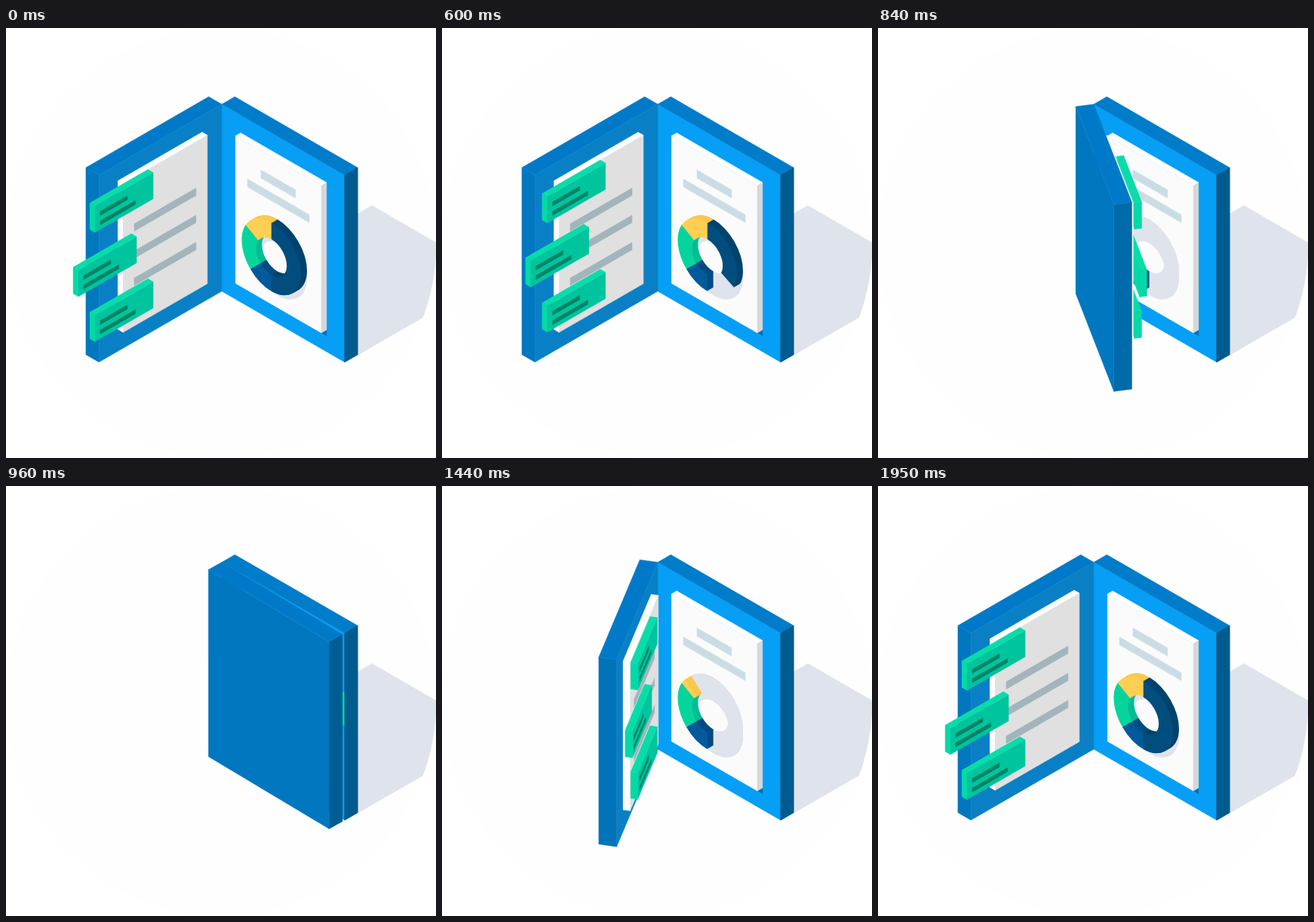
An HTML page with a canvas for the animation above (1.98 s loop, 570 by 570 pixels).

```html
<!DOCTYPE html>
<html lang="en">
<head>
<meta charset="utf-8">
<title>Folder</title>
<style>
  html, body { margin: 0; width: 100%; height: 100%; overflow: hidden; background: #fff; }
  canvas { display: block; }
</style>
</head>
<body>
<canvas id="stage" width="570" height="570"></canvas>
<script>
const ctx = document.getElementById('stage').getContext('2d');
const LOOP = 1980, STEP = 30, TURN = 1110;
const C = Math.cos(Math.PI / 6), RAD = Math.PI / 180;
const HINGE = [286, 101], W = 188, H = 248;

const ease = (t, from, to) => {
  const p = Math.min(1, Math.max(0, (t - from) / (to - from)));
  return p * p * (3 - 2 * p);
};
const mix = (a, b, k) => `rgb(${a.map((n, i) => Math.round(n + (b[i] - n) * k))})`;

function poly(color, points) {
  ctx.beginPath();
  points.forEach(p => ctx.lineTo(p[0], p[1]));
  ctx.closePath();
  ctx.fillStyle = ctx.strokeStyle = color;
  ctx.lineWidth = 0.4;
  ctx.fill();
  ctx.stroke();
}

// A leaf has u along its width, v downwards and w out of its inner face.
function leaf(d, m) {
  const at = (u, v, w) => [HINGE[0] + u * d[0] + w * m[0], HINGE[1] + u * d[1] + w * m[1] + v];
  const panel = (color, u0, u1, v0, v1, w) =>
    poly(color, [at(u0, v0, w), at(u1, v0, w), at(u1, v1, w), at(u0, v1, w)]);
  const edge = (color, u, v0, v1, w0, w1) =>
    poly(color, [at(u, v0, w0), at(u, v0, w1), at(u, v1, w1), at(u, v1, w0)]);
  const box = (u0, u1, v0, v1, w0, w1, face, end, top, inside) => {
    panel(face, u0, u1, v0, v1, inside ? w1 : w0);
    edge(end, u1, v0, v1, w0, w1);
    poly(top, [at(u0, v0, w0), at(u1, v0, w0), at(u1, v0, w1), at(u0, v0, w1)]);
  };
  return { panel, edge, box, at };
}

const right = leaf([C, 0.5], [-C, 0.5]);

function sector(color, x, y, from, to) {
  ctx.save();
  ctx.transform(C, 0.5, 0, 1, x, y);
  ctx.beginPath();
  ctx.arc(0, 0, 45.5, from * RAD, to * RAD);
  ctx.arc(0, 0, 23.5, to * RAD, from * RAD, true);
  ctx.closePath();
  ctx.fillStyle = color;
  ctx.fill();
  ctx.restore();
}

// start, end (degrees), side colour, front colour
const SLICES = [
  [90, 135, '#004b82', '#005a9c'],
  [135, 210, '#00bd94', '#05d59c'],
  [210, 270, '#fbc84c', '#ffcf54'],
  [270, 450, '#00436d', '#004d7e']
];

function donut(t) {
  const x = 359.6, y = 299, depth = 9;
  for (let i = 0; i <= 10; i++) sector('#dfe3eb', x, y + i, 0, 360);
  const end = 450 - 360 * ease(t, 450, 1010);
  for (let i = 0; i <= depth; i++) {
    for (const [from, to, side, front] of SLICES) {
      if (end > from) {
        sector(i < depth ? side : front, x - C * i, y + i / 2, from, Math.min(to, end));
      }
    }
  }
}

function ground() {
  ctx.save();
  ctx.beginPath();
  ctx.arc(285, 285, 285.5, 0, 2 * Math.PI);
  ctx.fillStyle = '#fefefe';
  ctx.fill();
  ctx.clip();
  poly('#dfe3ec', [[450, 255.5], [485, 235.3], [640, 324.8], [640, 333.5], [450, 443]]);
  ctx.restore();
}

function rightLeaf(t) {
  right.box(0, W, 0, H, -20, 0, '#069ff5', '#005b8f', '#007cca', true);
  poly('#0072bb', [[411, 400], [425, 400], [425, 408]]);
  right.box(29, 160.4, 23.5, 219, 0, 8, '#fbfbfb', '#d8d8d8', '#fff', true);
  right.panel('#cadde4', 68, 121, 49, 60, 8);
  right.panel('#cadde4', 47.3, 142, 71.4, 82, 8);
  donut(t);
}

function leftLeaf(t) {
  const angle = 89 * RAD * ease(t, 660, 960);
  const s = Math.sin(angle), c = Math.cos(angle), inside = c > s;
  const left = leaf([C * (s - c), (s + c) / 2], [C * (c + s), (c - s) / 2]);
  const slide = 50 * ease(t, 480, 720);

  const cover = () => left.box(0, W, 0, H, -20, 0,
    inside ? '#0980c6' : '#0077bf', mix([0, 119, 191], [0, 93, 147], 1 - c), '#007ac8', inside);

  const paper = () => {
    left.box(30, 159, 22, 219, 0, 8, '#e0e0e0', '#fff', '#fff', inside);
    if (!inside) return;
    for (let i = 0; i < 3; i++) {
      const v = 83.4 + 36 * i;
      left.panel('#a2b5bc', 47.3, 142, v, v + 10, 8);
    }
  };

  const tabs = () => {
    for (let i = 0; i < 3; i++) {
      const u = 211 + (i === 1 ? 25.4 : 0) - slide, v = 21 + 72.4 * i;
      left.box(u - 89, u, v, v + 35, 9, 17, inside ? '#00c49e' : '#06d9a8', '#06d8a6', '#08dda9', inside);
      if (!inside) continue;
      left.panel('#008566', u - 49.6, u - 8, v + 11, v + 16.5, 17);
      left.panel('#008566', u - 62, u - 8, v + 23.5, v + 29, 17);
    }
  };

  const parts = [cover, paper, tabs];
  if (!inside) parts.reverse();
  parts.forEach(draw => draw());
}

function frame(now) {
  const time = Math.floor((now % LOOP) / STEP) * STEP;
  const t = time > TURN ? 2 * TURN - time : time; // opening mirrors closing
  ctx.clearRect(0, 0, 570, 570);
  ground();
  rightLeaf(t);
  leftLeaf(t);
  right.edge('#005b8f', W, 0, H, -20, 0); // hides tab ends that reach past the edge
  requestAnimationFrame(frame);
}

let start;
requestAnimationFrame(function first(now) {
  start = now;
  frame(0);
});
const tick = frame;
frame = now => tick(now < start ? 0 : now - (now >= start ? start : 0));
</script>
</body>
</html>
```
